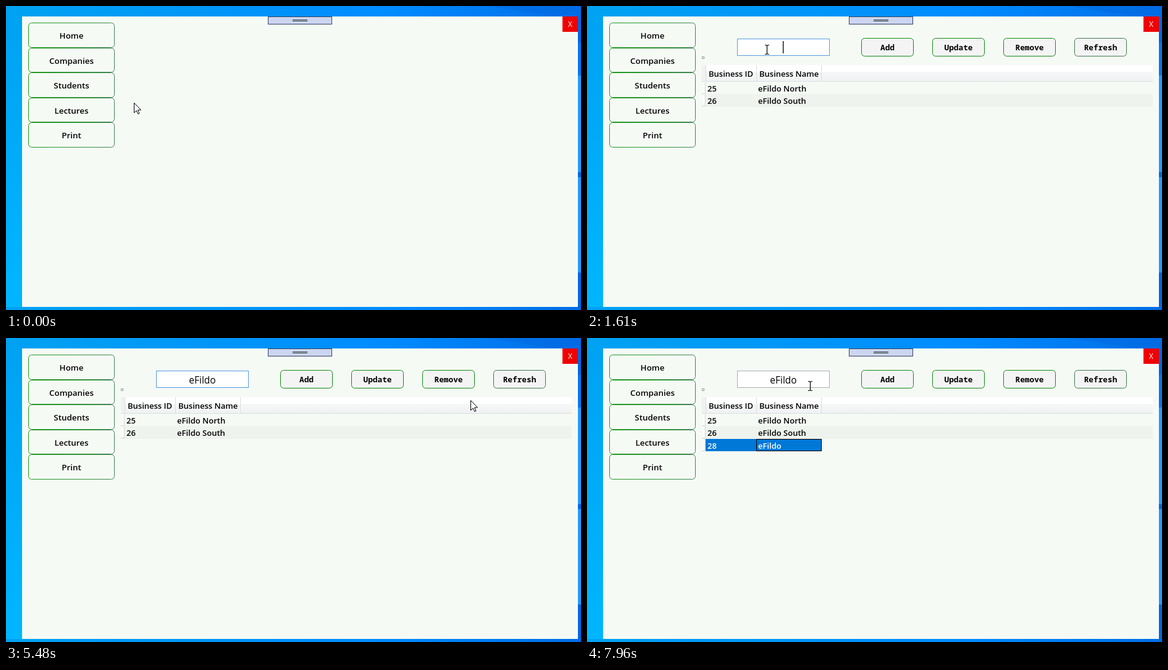
An HTML page that plays this animation: 931 by 494 pixels, repeating every 8 s.

```html
<!DOCTYPE html>
<html lang="en">
<head>
<meta charset="utf-8">
<title>Company register</title>
<style>
html, body { margin: 0; width: 100%; height: 100%; overflow: hidden; background: #0090ff; }
svg { display: block; }
text { font-family: "Open Sans", "Noto Sans", sans-serif; font-weight: 600; }
.nav { font-size: 13.4px; text-anchor: middle; }
.cell { font-size: 13px; }
.tool { font: 600 12.8px "Noto Sans Mono", "DejaVu Sans Mono", monospace; text-anchor: middle; }
#entry { font-size: 15.5px; font-weight: 400; text-anchor: middle; }
#halo { mix-blend-mode: multiply; }
</style>
</head>
<body>
<svg width="931" height="494" viewBox="0 0 931 494">
  <defs>
    <linearGradient id="sky">
      <stop offset="0" stop-color="#00a2f2"/><stop offset=".3" stop-color="#0098f6"/>
      <stop offset=".65" stop-color="#008cff"/><stop offset="1" stop-color="#006ee6"/>
    </linearGradient>
    <linearGradient id="side" x2="0" y2="1">
      <stop offset="0" stop-color="#00a2f2"/><stop offset="1" stop-color="#00b6ff"/>
    </linearGradient>
    <linearGradient id="head" x2="0" y2="1">
      <stop offset="0" stop-color="#fff"/><stop offset=".4" stop-color="#fff"/>
      <stop offset=".42" stop-color="#f6f8f8"/><stop offset="1" stop-color="#eff1f2"/>
    </linearGradient>
    <linearGradient id="edge">
      <stop offset="0" stop-color="#1f991f"/><stop offset=".75" stop-color="#369040"/>
      <stop offset="1" stop-color="#47805a"/>
    </linearGradient>
  </defs>

  <rect width="931" height="494" fill="url(#sky)"/>
  <path d="M780 0H931V17H890Z" fill="#0064dc" opacity=".4"/>
  <rect y="17" width="26" height="477" fill="url(#side)"/>
  <rect y="489" width="931" height="5" fill="url(#sky)"/>
  <rect x="926" y="17" width="5" height="477" fill="#0068e4"/>
  <path d="M926 60h5v53h-5z" fill="#0078f0"/>
  <path d="M926 113h5v157h-5zM926 278h5v155h-5z" fill="#1e9cff"/>
  <rect x="26" y="17" width="900" height="472" fill="#f5faf5"/>

  <rect x="424.5" y="17.5" width="103" height="12" fill="#ccd5f0" stroke="#34435f"/>
  <path d="M464 22.5h24M464 24.5h24" stroke="#2c3a3c"/>
  <rect x="901" y="17" width="25" height="25" fill="#f00000"/>
  <text x="913.5" y="34" font-size="12" style="font-weight:400" text-anchor="middle" fill="#fff">X</text>

  <g id="nav"></g>

  <g id="page">
    <rect x="186.500" y="82.500" width="3" height="3" fill="#fff" stroke="#999"/>
    <rect id="field" x="243.500" y="53.500" width="149" height="27" fill="#fff"/>
    <text id="entry" x="318" y="74"></text>
    <rect id="caret" y="57" width="1.300" height="20"/>
    <g id="tools"></g>
    <rect x="186" y="96" width="730" height="27" fill="url(#head)"/>
    <rect x="186" y="96" width="6" height="26" fill="#f0f1f1"/>
    <path d="M186 122.500H916M192.500 96V122M274.500 96V122M379.500 96V122" stroke="#dadede"/>
    <rect x="186" y="143" width="730" height="21" fill="#eef3ee"/>
    <text class="cell" x="197" y="115">Business ID</text>
    <text class="cell" x="279" y="115">Business Name</text>
    <g id="rows"></g>
  </g>

  <circle id="halo" r="11.500" fill="#fff85c"/>
  <path id="arrow" d="M.5 .5V16.500L4.200 13L6.800 18.500L9 17.500L6.500 12H11.500Z" fill="#fff" stroke="#000"/>
  <path id="beam" d="M-3 -7.500H-1L.5 -6.500L2 -7.500H4M.5 -6.500V6.500M-3 7.500H-1L.5 6.500L2 7.500H4" fill="none" stroke="#000" stroke-width="1.200"/>
</svg>

<script>
const LOOP = 8000;
const BRAND = "eFildo";
const $ = id => document.getElementById(id);
const show = (id, on) => $(id).setAttribute("visibility", on ? "inherit" : "hidden");
const within = (t, ranges) => ranges.some(([from, to]) => t >= from && t < to);

$("nav").innerHTML = ["Home", "Companies", "Students", "Lectures", "Print"].map((label, i) => {
  const top = Math.round(27 + i * 40.5 + .01), height = i % 2 ? 39 : 40;
  return `<rect id="nav${i}" x="36.5" y="${top + .5}" width="139" height="${height}" rx="5"
    fill="#f5faf5" stroke="url(#edge)"/><text class="nav" x="106" y="${top + 26}">${label}</text>`;
}).join("");

$("tools").innerHTML = ["Add", "Update", "Remove", "Refresh"].map((label, i) => {
  const x = 444.5 + i * 115;
  return `<rect x="${x}" y="52.5" width="84" height="29" rx="5" fill="#f4f4f5"
    stroke="${i === 3 ? "#3f7a4c" : "#128a12"}"/><text class="tool" x="${x + 42}" y="72">${label}</text>`;
}).join("");

$("rows").innerHTML = [[25, " North"], [26, " South"], [28, ""]].map(([id, suffix], i) => {
  const top = [123, 143, 164][i];
  return `<g id="row${i}"><path d="M186 ${top + 1}h5v18h-5z" fill="#fafbfa"/>
    <path d="M191.5 ${top + 1}v19M186 ${top + 19.500}h5" stroke="#d3d8d3"/>
    ${i === 2 ? `<rect id="picked" x="192" y="164" width="188" height="20" fill="#0078d7"/>
    <rect id="focus" x="274.500" y="164.500" width="105" height="19" fill="none" stroke="#000"/>` : ""}
    <text class="cell" x="195" y="${top + 16}">${id}</text>
    <text class="cell" x="277" y="${top + 16}">${BRAND}${suffix}</text></g>`;
}).join("");

// Pointer moves: start, end, number of steps, waypoints as [step, x, y]
const moves = [
  [70, 610, 8, [[0, 207, 157], [3, 165, 120], [6, 128, 91], [8, 127, 90]]],
  [1070, 1610, 8, [[0, 127, 90], [2, 160, 86], [4, 245, 74], [6, 291, 71], [8, 291, 71]]],
  [5250, 6020, 11, [[1, 845, 153], [4, 752, 101], [7, 540, 72], [9, 497, 68], [11, 497, 68]]],
  [6570, 7260, 10, [[0, 497, 68], [2, 425, 124], [4, 366, 170], [6, 351, 179], [8, 347, 172], [10, 347, 172]]],
  [7580, 7960, 6, [[0, 347, 172], [2, 351, 143], [4, 359, 95], [6, 361, 78]]]
];

function along(points, step) {
  const i = points.findIndex(p => p[0] >= step);
  if (i <= 0) return points[i ? points.length - 1 : 0].slice(1);
  const [a, b] = [points[i - 1], points[i]];
  const k = (step - a[0]) / (b[0] - a[0]);
  return [1, 2].map(n => Math.round(a[n] + (b[n] - a[n]) * k));
}

function pointerAt(t) {
  const move = moves.findLast(m => t >= m[0]);
  if (!move) return moves[0][3][0].slice(1);
  const [start, end, count, points] = move;
  const step = Math.floor((t - start + .5) / ((end - start) / (count - 1))) + 1;
  return along(points, Math.min(count, step));
}

const typedAt = [2690, 3540, 3770, 4170, 4470, 4790];
const caretOn = [[1530, 2070], [2540, 3230], [3540, 5320]];
const pressed = [[600, 760], [1530, 1605], [5930, 6170], [7180, 7580]];
let typed = -1;

function draw(t) {
  const [x, y] = pointerAt(t);
  const page = t >= 840;
  const visible = !within(t, [[2690, 5250]]);
  const overField = page && x >= 243 && x < 393 && y >= 53 && y < 81;
  const overNav = visible && x < 176 && y >= 68 && y < 108;

  show("arrow", visible && !overField);
  show("beam", visible && overField);
  for (const id of ["arrow", "beam"]) $(id).setAttribute("transform", `translate(${x} ${y})`);
  $("halo").setAttribute("transform", `translate(${x} ${y - 1})`);
  show("halo", within(t, pressed));
  $("nav1").setAttribute("fill", overNav ? "#e3fde3" : "#f5faf5");

  show("page", page);
  $("field").setAttribute("stroke", within(t, [[1530, 5930]]) ? "#569de5" : "#abadb3");
  const count = typedAt.filter(at => t >= at).length;
  if (count !== typed) {
    typed = count;
    $("entry").textContent = BRAND.slice(0, count);
    const width = count ? $("entry").getComputedTextLength() : 0;
    $("caret").setAttribute("x", Math.round(317 + width / 2));
  }
  show("caret", within(t, caretOn));

  show("row2", t >= 6170);
  show("picked", t >= 7180);
  show("focus", t >= 7580);
  if (t < 6170) { show("picked", false); show("focus", false); }
  $("row2").setAttribute("fill", t >= 7180 ? "#fff" : "#000");
}

const began = performance.now();
function tick() {
  draw((performance.now() - began) % LOOP);
  requestAnimationFrame(tick);
}
tick();
</script>
</body>
</html>
```
